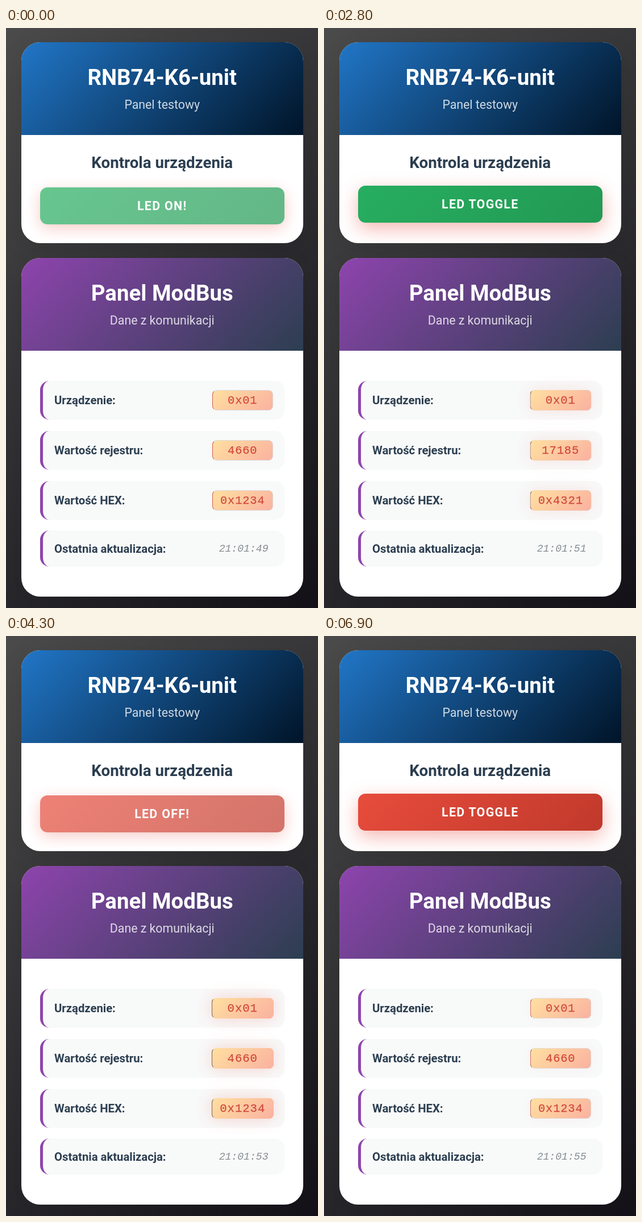
Write an HTML page that moves like this. It is 549 px wide and 1019 px high and loops after 7 s.

```html
<!DOCTYPE html>
<html lang="pl">
<head>
<meta charset="utf-8">
<title>Panel testowy</title>
<style>
  html, body { margin: 0; width: 100%; height: 100%; overflow: hidden; }
  body {
    position: relative;
    background: linear-gradient(135deg, #4b4b4b, #141218);
    font-family: Roboto, "Open Sans", sans-serif;
    color: #2c3e50;
  }
  div { position: absolute; box-sizing: border-box; }

  .card {
    left: 27px; width: 495.5px;
    border-radius: 33px;
    overflow: hidden;
    background: #fff;
    box-shadow: 0 13px 40px rgba(0, 0, 0, .1);
  }
  .head { left: 0; top: 0; width: 100%; height: 162.5px; color: #fff; }
  .blue { background: linear-gradient(135deg, #2176c7, #001428); }
  .purple { background: linear-gradient(135deg, #8e44ad, #2c3e50); }

  /* single lines, centred on their top value */
  .line {
    left: 0; width: 100%; height: 40px; margin-top: -20px;
    line-height: 40px; text-align: center; white-space: pre;
  }
  .title { top: 61.5px; font-size: 38.4px; font-weight: 600; }
  .sub { top: 109.5px; font-size: 21.3px; opacity: .8; }
  .h2 { top: 212px; font-size: 27.7px; font-weight: 600; }

  #button {
    left: 33px; top: 252px; width: 429.5px; height: 65px;
    border-radius: 13px;
    color: #fff;
  }
  #caption { top: 50%; font-size: 21.3px; font-weight: 600; letter-spacing: 1.33px; }
  #tap {
    left: 33px; top: 252px; width: 429.5px; height: 65px;
    background: rgb(60, 150, 190);
  }

  .row {
    left: 33px; width: 429.5px;
    background: #f8f9f9;
    border-left: 5.3px solid #8e44ad;
    border-radius: 16px;
  }
  .label { top: 50%; left: 20px; text-align: left; font-size: 20.25px; font-weight: 600; }
  .value {
    right: 20px; top: 16px; width: 106.5px; height: 36px;
    border: 1.4px solid #e3e7e9; border-radius: 8px;
    background: #fff border-box;
    color: #d14a3c;
    font: 20.3px/35px "Liberation Mono", "DejaVu Sans Mono", monospace;
    -webkit-text-stroke: .25px;
    letter-spacing: .9px;
    text-align: center;
  }
  #clock {
    top: 50%; left: auto; right: 28px; width: 120px;
    text-align: right;
    font: italic 18.1px/40px "Liberation Mono", "DejaVu Sans Mono", monospace;
    color: #858f92;
  }
</style>
</head>
<body>
  <div class="card" style="top:25px;height:353px">
    <div class="head blue">
      <div class="line title">RNB74-K6-unit</div>
      <div class="line sub">Panel testowy</div>
    </div>
    <div class="line h2">Kontrola urządzenia</div>
    <div id="button"><div class="line" id="caption"></div></div>
    <div id="tap"></div>
  </div>

  <div class="card" style="top:404px;height:595px">
    <div class="head purple">
      <div class="line title">Panel ModBus</div>
      <div class="line sub">Dane z komunikacji</div>
    </div>
    <div class="row" style="top:216px;height:68px">
      <div class="line label">Urządzenie:</div><div class="value"></div>
    </div>
    <div class="row" style="top:303.8px;height:68px">
      <div class="line label">Wartość rejestru:</div><div class="value"></div>
    </div>
    <div class="row" style="top:391.6px;height:68px">
      <div class="line label">Wartość HEX:</div><div class="value"></div>
    </div>
    <div class="row" style="top:479.4px;height:62.6px">
      <div class="line label">Ostatnia aktualizacja:</div><div class="line" id="clock"></div>
    </div>
  </div>

<script>
const LOOP = 7000, POLL = 2000, FLASH = 1000;
const GREEN = 'linear-gradient(135deg, #27ae60, #229954)';
const RED = 'linear-gradient(135deg, #e74c3c, #c0392b)';
const READINGS = [0x1234, 0x4321, 0x1234, 0x1234];
// start time, button caption, button fill
const STATES = [
  [0, 'LED ON!', GREEN],
  [900, 'LED TOGGLE', GREEN],
  [3450, 'LED...', GREEN],
  [4000, 'LED OFF!', RED],
  [5540, 'LED TOGGLE', RED]
];

const byId = id => document.getElementById(id);
const button = byId('button'), caption = byId('caption'), tap = byId('tap'), clock = byId('clock');
const values = [...document.querySelectorAll('.value')];

const mix = (a, b, k) => a + (b - a) * k;
const ramp = (t, from, length) => Math.min(1, Math.max(0, (t - from) / length));
const ease = x => 1 - (1 - x) ** 2;
const rgb = (a, b, k) => `rgb(${a.map((v, i) => Math.round(mix(v, b[i], k)))})`;
const write = (el, text) => { if (el.textContent !== text) el.textContent = text; };

// 0 = button disabled, 1 = raised and ready
const ready = (t, press) =>
  t < press ? ease(ramp(t, 900, 400)) :
  t < 5540 ? 1 - ease(ramp(t, press, 350)) :
  ease(ramp(t, 5540, 350));

function drawButton(t) {
  const [, text, fill] = STATES.filter(s => s[0] <= t).pop();
  const fade = ready(t, 3400), lift = ready(t, 3480);
  write(caption, text);
  caption.style.opacity = text === 'LED...' ? mix(.65, 1, ramp(t, 3550, 200)) : 1;
  button.style.background = fill;
  button.style.opacity = mix(.7, 1, fade);
  button.style.transform = `translateY(${mix(3, 0, lift)}px)`;
  button.style.boxShadow =
    `0 ${mix(7, 10.7, lift)}px ${mix(27, 33, lift)}px rgba(231, 76, 60, .4)`;
  tap.style.opacity = t < 3450 ? 0 : .33 * (1 - ramp(t, 3550, 200));
}

function drawValues(t) {
  const poll = Math.floor(t / POLL), phase = (t % POLL) / FLASH;
  const reading = READINGS[poll];
  const lit = phase < 1;
  const glow = lit ? Math.sin(Math.PI * phase) ** 2 : 0;
  const edge = Math.min(1, glow * 2);
  const texts = ['0x01', String(reading), '0x' + reading.toString(16)];
  values.forEach((el, i) => {
    const s = el.style;
    write(el, texts[i]);
    s.background = lit ? 'linear-gradient(135deg, #ffe0a0, #fab1a0) border-box' : '#fff';
    s.borderColor = lit ? `rgba(218, 220, 224, ${1 - edge})` : '#e3e7e9';
    if (lit) s.borderLeftColor = rgb([212, 88, 72], [112, 98, 90], edge);
    s.boxShadow = `0 0 27px rgba(231, 76, 60, ${.34 * glow})`;
    s.transform = `scale(${1 + .03 * glow})`;
  });
  write(clock, '21:01:' + (49 + 2 * poll));
}

function frame() {
  const t = performance.now() % LOOP;
  drawButton(t);
  drawValues(t);
  requestAnimationFrame(frame);
}
frame();
</script>
</body>
</html>
```
